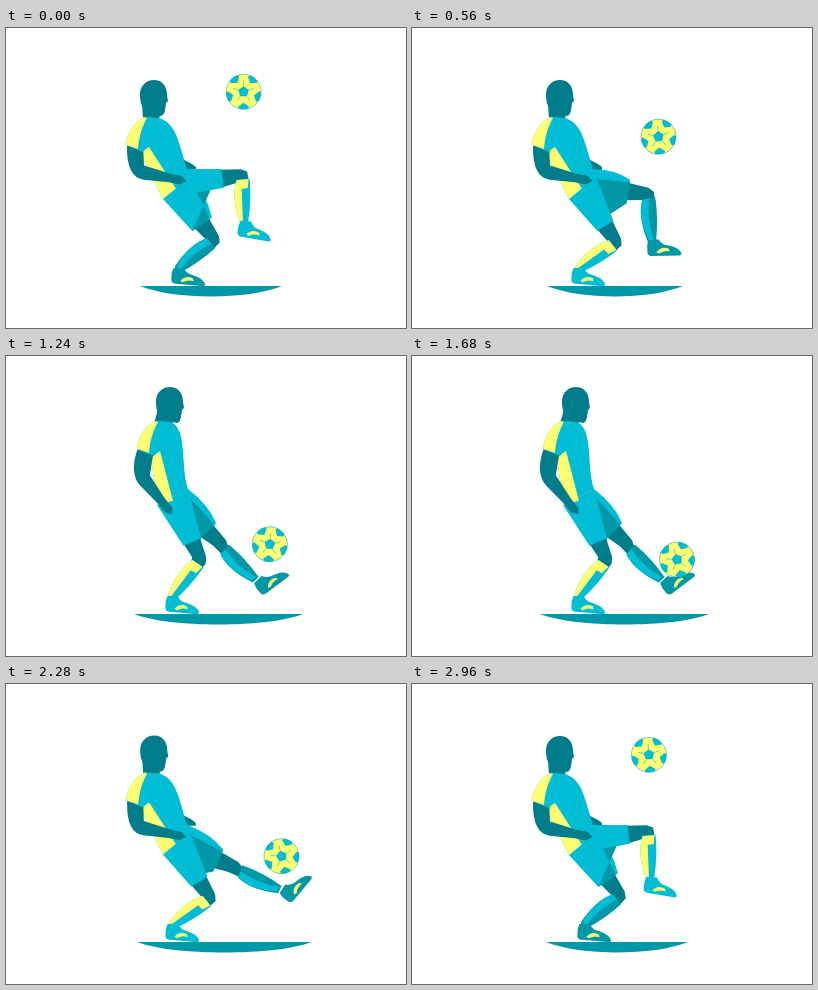
An HTML page that plays this animation: 400x300 px, repeating every 3 s.

```html
<!DOCTYPE html>
<html lang="en">
<head>
<meta charset="utf-8">
<title>Football juggling</title>
<style>
  html, body { margin: 0; width: 100%; height: 100%; overflow: hidden; background: #fff; }
  svg { display: block; width: 100%; height: 100%; }
</style>
</head>
<body>
<svg id="stage" viewBox="0 0 400 300"></svg>
<script>
const LOOP = 3000;
const CYAN = '#00bcd4', MID = '#0097a7', SKIN = '#007c8a', YELLOW = '#ffff72';
const THIGH = 70, SHIN = 47, UPPER_ARM = 26, FOREARM = 46;
const stage = document.getElementById('stage');

function add(parent, tag, attrs = {}) {
  const el = document.createElementNS('http://www.w3.org/2000/svg', tag);
  for (const name in attrs) el.setAttribute(name, attrs[name]);
  return parent.appendChild(el);
}
const fill = color => add(stage, 'path', { fill: color });
const draw = (el, d) => el.setAttribute('d', d);
const place = (el, p, turn = 0) =>
  el.setAttribute('transform', `translate(${xy(p)}) rotate(${turn})`);

// Points and vectors
const xy = p => p[0].toFixed(2) + ' ' + p[1].toFixed(2);
const poly = (...points) => 'M' + points.map(xy).join('L') + 'Z';
const move = (p, x, y) => [p[0] + x, p[1] + y];
const mix = (a, b, k) => a.map((value, i) => value + (b[i] - value) * k);
const direction = (a, b) => {
  const x = b[0] - a[0], y = b[1] - a[1], length = Math.hypot(x, y);
  return [x / length, y / length, length];
};
// A point beside p: "along" follows the line a-b, "side" is measured to its left
function beside(p, a, b, along, side) {
  const [dx, dy] = direction(a, b);
  return move(p, dx * along + dy * side, dy * along - dx * side);
}
// The bend of a two-part limb between its ends
function joint(a, b, upper, lower, side) {
  const length = Math.min(direction(a, b)[2], upper + lower);
  const along = (upper ** 2 - lower ** 2 + length ** 2) / (2 * length);
  return beside(a, a, b, along, side * Math.sqrt(Math.max(0, upper ** 2 - along ** 2)));
}

// Body postures; the hand is relative to the hip, a foot is ankle x, y and tilt
const crouched = { hip: [168, 156], crouch: [1], hand: [7, -4] };
const upright = { hip: [167, 141], crouch: [0], hand: [-4, 13] };
const planted = [165, 242, 28];
const kneeUp = { ...crouched, near: [238, 195, 33], far: [171, 242, 28], shadow: [134, 276] };
const hop = {
  hip: [171, 124], crouch: [0], hand: [-23, 14],
  near: [174, 228, 42], far: [208, 220, 29], shadow: [154, 263]
};
const footOut = { ...crouched, near: planted, far: [240, 214, 22], shadow: [135, 271] };
const stand = { ...upright, near: planted, far: [252, 226, -14], shadow: [128, 297] };
const kick = { ...crouched, near: planted, far: [278, 207, -28], shadow: [131, 306] };
const TIMELINE = [
  [0, kneeUp], [280, hop], [560, footOut], [1120, stand], [1680, stand],
  [2260, kick], [2560, hop], [2860, kneeUp], [LOOP, kneeUp]
];
const ease = u => (1 - Math.cos(Math.PI * u)) / 2;

// The step of a list of timed entries that is under way, and how far it is
function stepAt(list, t) {
  const i = list.findIndex((entry, n) => n === list.length - 2 || t < list[n + 1][0]);
  const [from, to] = [list[i], list[i + 1]];
  return { from, to, span: to[0] - from[0], u: (t - from[0]) / (to[0] - from[0]) };
}
function poseAt(t) {
  const { from, to, u } = stepAt(TIMELINE, t);
  const pose = {};
  for (const part in from[1]) pose[part] = mix(from[1][part], to[1][part], ease(u));
  return pose;
}

// Where the ball is touched: four times by the foot, then by the knee
const TOUCHES = [[780, 250, 199], [1280, 265, 204], [1680, 265, 204], [2240, 279, 194], [2776, 234, 121]];
TOUCHES.push([TOUCHES[0][0] + LOOP, TOUCHES[0][1], TOUCHES[0][2]]);
function ballAt(t) {
  const { from, to, span, u } = stepAt(TOUCHES, t < TOUCHES[0][0] ? t + LOOP : t);
  const [, x, y] = mix(from, to, u);
  return [x, y - 0.107 * span * 4 * u * (1 - u)];
}

// Sock and shoe have their own axes: shin down, toe to the right
function makeLeg(sockColor, shoeColor, stripe, stripeColor) {
  const thigh = fill(SKIN);
  const sock = add(stage, 'g');
  add(sock, 'path', { fill: sockColor, d: 'M-7 4L6 3Q8 24 4 47L-4 47Q-13 21 -7 4Z' });
  add(sock, 'path', { fill: stripeColor, d: stripe });
  const shoe = add(stage, 'g');
  add(shoe, 'path', {
    fill: shoeColor, d: 'M-4 0L5 -5Q10 -1 17 -3Q28 -5 32 0L31 2L5 13Q1 15 -1 10Q-4 5 -4 0Z'
  });
  add(shoe, 'path', { fill: YELLOW, d: 'M8 8Q10 0 18 0L20 2Q14 3 11 8Z' });
  return { thigh, sock, shoe };
}
function drawLeg(leg, hip, hem, knee, foot) {
  const [dx, dy] = direction(knee, foot);
  const at = (p, along, side) => beside(p, hip, knee, along, side);
  draw(leg.thigh, poly(at(hem, -3, 9), at(knee, -2, 7), at(knee, 4, 4),
    move(knee, dx * 8 + dy * 6, dy * 8 - dx * 6), move(knee, dx * 8 - dy * 6, dy * 8 + dx * 6),
    at(knee, -7, -6), at(hem, -3, -9)));
  place(leg.sock, knee, Math.atan2(-dx, dy) * 180 / Math.PI);
  place(leg.shoe, foot, foot[2]);
}
function hemOf(hip, knee, half) {
  const middle = beside(knee, hip, knee, -21, 0);
  return {
    middle,
    front: beside(middle, hip, knee, 0, half),
    back: beside(middle, hip, knee, 0, -half)
  };
}

// Layers from back to front
const shadow = fill(MID);
const farArm = fill(SKIN);
const farLeg = makeLeg(MID, MID, 'M-7 4L0 4Q-4 24 2 45L-3 45Q-13 21 -7 4Z', CYAN);
const farShorts = fill(CYAN);
const farShade = fill(MID);
const nearLeg = makeLeg(CYAN, CYAN, 'M-7 4L5 3L4 12L-2 13L-1 47L-4 47Q-13 21 -7 4Z', YELLOW);
const nearShorts = fill(CYAN);
const neckShape = fill(SKIN);
const shirt = fill(CYAN);
const panel = fill(YELLOW);
const arm = fill(SKIN);
const sleeve = add(stage, 'g');
add(sleeve, 'path', { fill: CYAN, d: 'M-7 -1L8 0L3 20L-8 34L-25 27C-24 14 -17 5 -7 -1Z' });
add(sleeve, 'path', { fill: YELLOW, d: 'M-7 -1C-17 5 -24 14 -25 27L-13 31C-12 17 -8 7 -4 0Z' });
const head = add(stage, 'path', {
  fill: SKIN,
  d: 'M-13 2C-14 -9 -7 -15 1 -15C9 -15 14 -9 14 0L15 6L13 8L12 15Q11 21 7 21L0 18L-10 13Q-13 8 -13 2Z'
});

const ball = add(stage, 'g');
const clip = add(add(stage, 'defs'), 'clipPath', { id: 'round' });
add(clip, 'circle', { r: 17.5 });
add(ball, 'circle', { r: 17.5, fill: YELLOW });
const pattern = add(ball, 'g', { 'clip-path': 'url(#round)' });
const polar = (angle, radius) => [Math.sin(angle) * radius, -Math.cos(angle) * radius];
const FIFTH = Math.PI * 0.4;
function pentagon(center, turn) {
  const corners = [0, 1, 2, 3, 4].map(i => move(center, ...polar(turn + i * FIFTH, 5.6)));
  add(pattern, 'path', { fill: CYAN, d: poly(...corners) });
}
pentagon([0, 0], 0);
for (let i = 0; i < 5; i++) {
  const turn = i * FIFTH;
  pentagon(polar(turn + FIFTH / 2, 16.5), turn);
  add(pattern, 'path', { stroke: CYAN, 'stroke-width': 0.35, d: poly(polar(turn, 6), polar(turn, 11)) });
}
add(ball, 'circle', { r: 17.5, fill: 'none', stroke: MID, 'stroke-width': 0.5 });

function render(t) {
  const { hip, crouch: [crouch], hand: reach, near, far, shadow: [left, right] } = poseAt(t);
  const lean = (tall, low) => mix(tall, low, crouch);
  const neck = move(hip, ...lean([-11, -75], [-23, -66]));
  const face = move(neck, ...lean([7, -20], [2, -23]));
  const back = move(hip, ...lean([-16, 8], [-11, 15]));
  const front = move(hip, ...lean([15, -8], [13, -15]));

  draw(shadow, `M${left} 258H${right}C${right - 35} 272 ${left + 35} 272 ${left} 258Z`);

  const farHand = move(front, 20 * crouch - 15, -1);
  draw(farArm, poly(move(neck, 10, 30), move(farHand, 0, -4), move(farHand, 4, -1),
    move(farHand, 4, 2), move(farHand, -8, 2)));

  const nearKnee = joint(hip, near, THIGH, SHIN, 1);
  const farKnee = joint(hip, far, THIGH, SHIN, 1);
  const nearHem = hemOf(hip, nearKnee, 9.5);
  const farHem = hemOf(hip, farKnee, 12);
  const bulge = beside(mix(front, farHem.front, 0.5), front, farHem.front, 3, 6);
  drawLeg(farLeg, hip, farHem.middle, farKnee, far);
  draw(farShorts, `M${xy(front)}Q${xy(bulge)} ${xy(farHem.front)}L${xy(farHem.back)}L${xy(back)}Z`);
  draw(farShade, poly(move(front, 3, 10), mix(farHem.front, farHem.back, 0.1), farHem.back,
    mix(hip, nearHem.middle, 0.85)));
  drawLeg(nearLeg, hip, nearHem.middle, nearKnee, near);
  draw(nearShorts, poly(back, front, nearHem.front, nearHem.back));

  draw(neckShape, poly(move(face, -11, 8), move(neck, -8, 1), move(neck, 8, 2), move(face, 7, 19)));
  const armpit = move(neck, -11, 35);
  draw(shirt, `M${xy(move(neck, -7, -1))}L${xy(move(neck, 8, 0))}`
    + `C${xy(move(neck, 26, 5))} ${xy(move(front, -8, -24))} ${xy(front)}`
    + `L${xy(back)}L${xy(armpit)}Z`);
  draw(panel, poly(armpit, move(neck, -2, 29), move(mix(back, front, 0.45), 2, 3), back));

  const shoulder = move(neck, -16, 27);
  const hand = move(hip, ...reach);
  const elbow = joint(shoulder, hand, UPPER_ARM, FOREARM, -1);
  const upper = side => beside(shoulder, shoulder, elbow, 0, side);
  const lower = (k, side) => beside(mix(elbow, hand, k), elbow, hand, 0, side);
  draw(arm, `M${xy(upper(8))}L${xy(upper(-8))}Q${xy(lower(-0.18, -8))} ${xy(lower(0.2, -7))}`
    + `L${xy(lower(0.75, -4.5))}L${xy(lower(1, -4.5))}L${xy(lower(1.12, 0))}`
    + `L${xy(lower(1, 4))}L${xy(lower(0.75, 4))}L${xy(lower(0.15, 7))}Z`);

  place(sleeve, neck);
  place(head, face);
  place(ball, ballAt(t), t / LOOP * 360);
}

const start = performance.now();
function tick() {
  render((performance.now() - start) % LOOP);
  requestAnimationFrame(tick);
}
tick();
</script>
</body>
</html>
```
